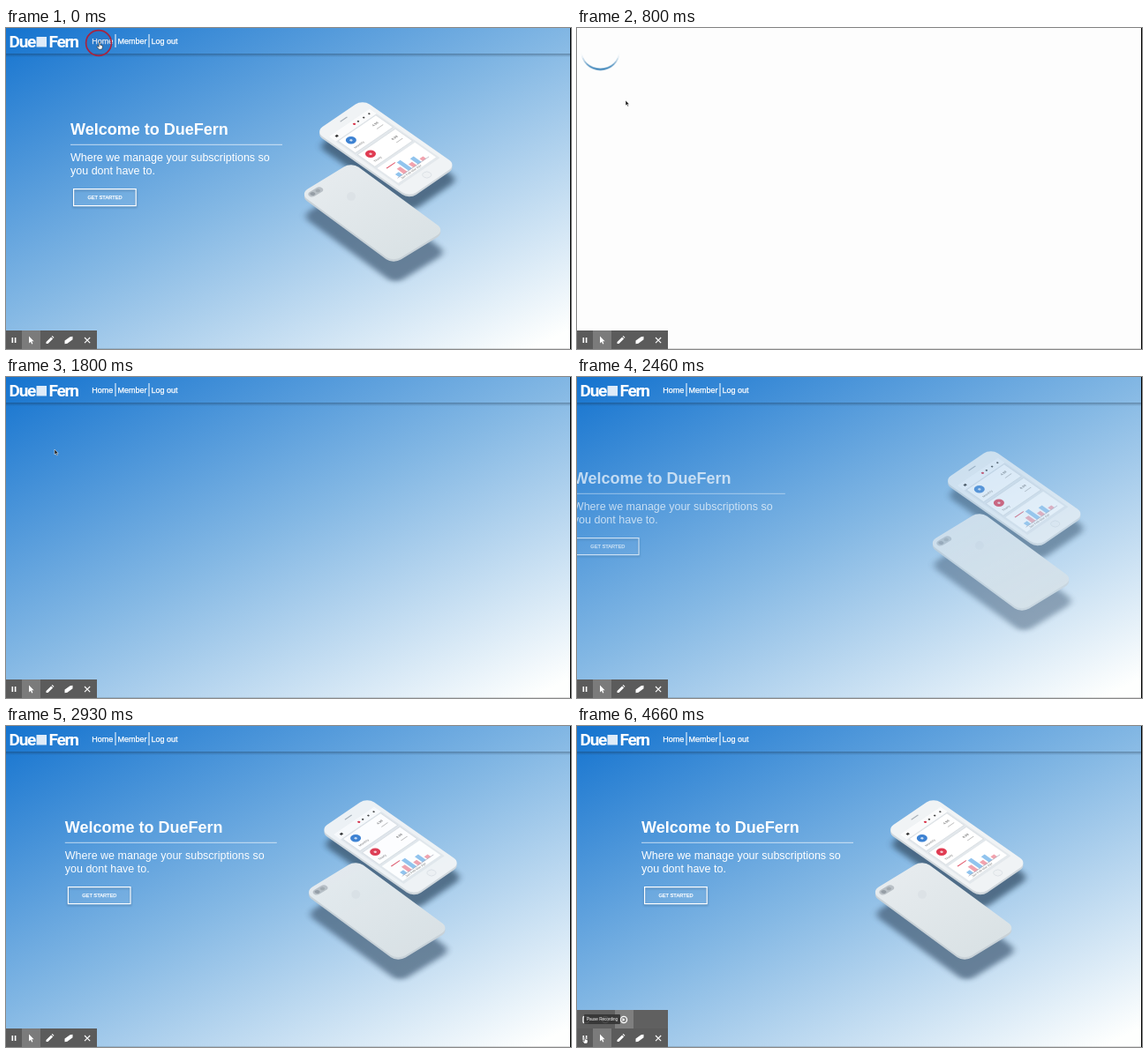
An HTML page for the animation above (4730 ms loop, 640 by 364 pixels).

```html
<!DOCTYPE html>
<html lang="en">
<head>
<meta charset="utf-8">
<title>DueFern</title>
<style>
  html, body { margin: 0; width: 100%; height: 100%; overflow: hidden; background: #fdfdfd; }
  svg { display: block; width: 640px; height: 364px; }
  text { font-family: "Liberation Sans", Arial, sans-serif; fill: #fff; }
  .logo { font: 700 19px Roboto, sans-serif; letter-spacing: -1.2px; }
  .nav { font-size: 9px; }
  .nav, .button { stroke: #fff; stroke-width: .25px; }
  .lead { font-size: 12.5px; }
  .tiny { font-size: 3.4px; fill: #777; }
</style>
</head>
<body>
<svg viewBox="0 0 640 364">
  <defs>
    <linearGradient id="sky" gradientUnits="userSpaceOnUse" x1="0" y1="0" x2="273" y2="546">
      <stop offset="0" stop-color="#1473cf"/>
      <stop offset=".48" stop-color="#84b8e4"/>
      <stop offset=".97" stop-color="#fefffe"/>
    </linearGradient>
    <linearGradient id="drop" x2="0" y2="1">
      <stop offset="0" stop-color="#123" stop-opacity=".34"/><stop offset="1" stop-color="#123" stop-opacity="0"/>
    </linearGradient>
    <linearGradient id="shell" x2="0" y2="1">
      <stop offset="0" stop-color="#e6ebee"/><stop offset="1" stop-color="#dae2e5"/>
    </linearGradient>
    <filter id="soft" x="-30%" y="-30%" width="160%" height="160%"><feGaussianBlur stdDeviation="3"/></filter>
    <filter id="lift" x="-20%" y="-20%" width="140%" height="160%"><feGaussianBlur stdDeviation="1.3"/></filter>
    <rect id="body" width="60" height="120" rx="9"/>
  </defs>

  <g id="page">
    <rect width="640" height="364" fill="url(#sky)"/>
    <rect y="29" width="640" height="4" fill="url(#drop)"/>
    <text class="logo" x="3.5" y="22">Due</text>
    <rect x="34.5" y="10" width="11.5" height="11.5" fill="#fff" opacity=".85"/>
    <text class="logo" x="48.5" y="22">Fern</text>
    <g class="nav">
      <text x="97.3" y="17.6">Home</text>
      <text x="126.6" y="17.6">Member</text>
      <text x="164.5" y="17.6">Log out</text>
    </g>
    <path d="M124 7v15M162 7v15" stroke="#fff"/>

    <g id="hero">
      <g id="intro">
        <text x="73" y="121" font-size="18" font-weight="700">Welcome to DueFern</text>
        <path d="M73 132.3h240" stroke="#fff" stroke-width=".9" opacity=".75"/>
        <text class="lead" x="73" y="151.3">Where we manage your subscriptions so</text>
        <text class="lead" x="73" y="165.8">you dont have to.</text>
        <rect x="76.5" y="184" width="71" height="19" fill="none" stroke="#246" stroke-width="1.6" opacity=".35" filter="url(#lift)"/>
        <rect x="76.6" y="182.6" width="70.6" height="19" fill="#fff" fill-opacity=".06" stroke="#fff" stroke-width="1.2"/>
        <text class="button" x="112" y="194.2" font-size="5.7" text-anchor="middle">GET STARTED</text>
      </g>

      <g id="phones">
        <use href="#body" transform="matrix(.89 -.61 .885 .62 353 134)" fill="#3b5670" opacity=".8" filter="url(#soft)"/>
        <use href="#body" transform="matrix(.975 -.6 .88 .646 335 213)" fill="#46607a" opacity=".75" filter="url(#soft)"/>

        <use href="#body" transform="matrix(.89 -.61 .885 .62 350.5 120)" fill="#d0d7dc"/>
        <g transform="matrix(.89 -.61 .885 .62 350.5 117.5)">
          <use href="#body" fill="#f0f3f5"/>
          <rect x="25" y="6" width="9" height="1.2" rx=".6" fill="#aab2ba"/>
          <rect x="4" y="13" width="52" height="90" fill="#e3e8ec"/>
          <rect x="4" y="13" width="52" height="9" fill="#fafbfc"/>
          <rect x="8.5" y="16.3" width="2.6" height="2.4" fill="#333"/>
          <circle cx="32" cy="17.5" r="1.3" fill="#d8344a"/>
          <g fill="#444"><circle cx="37" cy="17.5" r="1"/><circle cx="44" cy="17.5" r="1"/><circle cx="51" cy="17.5" r="1"/></g>
          <g id="cards"></g>
          <rect x="6" y="73" width="48" height="27" fill="#fff"/>
          <g id="bars"></g>
          <path d="M10 95h40" stroke="#99a" stroke-width=".5"/>
          <circle cx="32" cy="110.5" r="4" fill="#eef1f3" stroke="#d5dbe0" stroke-width=".6"/>
        </g>

        <use href="#body" transform="matrix(.975 -.6 .88 .646 333 190.5)" fill="#c8d1d7"/>
        <g transform="matrix(.975 -.6 .88 .646 333 188)">
          <use href="#body" fill="url(#shell)"/>
          <rect x="4" y="4" width="15" height="7" rx="3.5" fill="#b9c0c6"/>
          <circle cx="8" cy="7.5" r="2.2" fill="#959da5"/><circle cx="14" cy="7.5" r="2" fill="#a2aab0"/>
        </g>
        <circle cx="391" cy="191" r="5" fill="#dce2e6"/>
      </g>
    </g>
  </g>

  <path id="spinner" d="M-21.5 0A21.5 21.5 0 0 0 21.5 0A21.5 19.6 0 0 1 -21.5 0Z" fill="#2374b0"/>

  <path d="M0 363.5h640" stroke="#000" opacity=".13"/>
  <path d="M639.5 0v364" stroke="#000"/>

  <g id="panel">
    <rect y="322" width="103" height="21" fill="#606060"/>
    <rect x="43" y="322" width="21" height="21" fill="#7f7f7f"/>
    <g fill="none" stroke="#fff" stroke-width="1.3">
      <rect x="7" y="329.5" width="6" height="7" rx="1"/><circle cx="32" cy="333" r="3.6"/><circle cx="53" cy="333" r="3.6"/>
    </g>
    <path d="M51.5 331v4l3-2z" fill="#fff"/>
  </g>
  <g id="tip">
    <rect x="8" y="327" width="41" height="11" rx="1" fill="#333" opacity=".88"/>
    <text x="28.5" y="334.2" font-size="4.6" text-anchor="middle">Pause Recording</text>
  </g>
  <g id="toolbar">
    <rect y="343" width="103" height="21" fill="#5b5b5b"/>
    <rect x="18" y="343" width="21" height="21" fill="#7b7b7b"/>
    <g fill="#fff">
      <path d="M6.5 351h1.6v6h-1.6zM9.8 351h1.6v6h-1.6z"/>
      <path d="M26 349.5v8l1.9-1.7 1.3 2.8 1.2-.6-1.3-2.7h2.4z"/>
      <path d="M45.5 358v-2l5.6-5.6 2 2-5.6 5.6zM51.7 349.8l.8-.8 2 2-.8.8z"/>
      <path d="M66.5 354.5l6-4.2 3-.6v3.6l-6 4.4-3 .6z"/>
    </g>
    <path d="M89 351l6.2 6.2M95.2 351l-6.2 6.2" stroke="#fff" stroke-width="1.1"/>
  </g>

  <circle id="ring" cx="105" cy="17" r="14.4" fill="#1c3f8a" fill-opacity=".12" stroke="#a8243f" stroke-width="1.7"/>
  <g id="cursor">
    <path id="arrow" d="M0-2v6l1.4-1.2 1 2.1 1-.4-1-2.1h1.8z" fill="#151515" stroke="#fff" stroke-width=".5"/>
    <path id="hand" d="M-.8-3.4q.8-.8 1.5 0v2.6l2.6.7v2.3l-.8 2h-3.3l-2.2-3 .6-.8 1.6 1z" fill="#fff" stroke="#222" stroke-width=".6"/>
  </g>
</svg>
<script>
const LOOP = 4730, TICK = 200 / 3, LEAVE = 800;
const $ = id => document.getElementById(id);
const show = (id, on) => { $(id).style.display = on ? '' : 'none'; };

// Phone screen contents
const card = (y, color, label, price) => `
  <rect x="6" y="${y}" width="48" height="22" fill="#fff" stroke="#cdd3d9" stroke-width=".5"/>
  <circle cx="15" cy="${y + 7.5}" r="4.8" fill="${color}"/>
  <circle cx="15" cy="${y + 7.5}" r="1.4" fill="#fff" opacity=".75"/>
  <text class="tiny" x="10" y="${y + 18}">${label}</text>
  <text class="tiny" x="42" y="${y + 9}" font-weight="700">${price}</text>
  <rect x="42" y="${y + 13}" width="8" height=".8" fill="#bbb"/>`;
$('cards').innerHTML = card(23, '#3d82d2', 'Monthly', '4.99') + card(48, '#e03c52', 'Yearly', '8.99');

const bar = (x, h, color) => `<rect x="${x}" y="${95 - h}" width="4.4" height="${h}" fill="${color}"/>`;
$('bars').innerHTML =
  [5, 9, 15, 6, 10, 4].map((h, i) => bar(12 + i * 6, h, i % 2 ? '#f2a3ae' : '#91c4ee')).join('') +
  '<path d="M12 79h11" stroke="#e0566a"/>' +
  '<text class="tiny" x="12" y="98.8">Jan Feb Mar Apr</text>';

// Paused animations, positioned by the clock
const track = (id, frames, delay, duration, easing = 'ease') => {
  const a = $(id).animate(frames, { delay, duration, easing, fill: 'both' });
  a.pause();
  return a;
};
const at = (x, y) => `translate(${x}px, ${y}px)`;
const slide = (id, x) => track(id, [
  { transform: at(x, 0), opacity: 0 },
  { transform: at(0, 0), opacity: 1 }
], 2000, 1175);

const entrances = [slide('intro', -240), slide('phones', 202)];
const clocked = [
  track('ring', [{ opacity: 1 }, { opacity: 0 }], 0, 200, 'linear'),
  track('spinner', [
    { transform: at(26.5, 26.5) + ' rotate(0deg)' },
    { transform: at(26.5, 26.5) + ' rotate(360deg)' }
  ], 1000, 800, 'linear'),
  track('cursor', [
    { transform: at(106, 20), offset: 0, easing: 'ease-in-out' },
    { transform: at(55, 84), offset: 530 / LOOP },
    { transform: at(55, 84), offset: 3660 / LOOP, easing: 'ease-in-out' },
    { transform: at(9, 356), offset: 4260 / LOOP },
    { transform: at(9, 356), offset: 1 }
  ], 0, LOOP, 'linear')
];

function draw(time) {
  const t = Math.floor((time + 7) / TICK) * TICK;
  const before = t < LEAVE;
  entrances.forEach(a => { a.currentTime = before ? LOOP : t; });
  clocked.forEach(a => { a.currentTime = t; });
  show('page', before || t >= 1730);
  show('hero', before || t >= 2060);
  show('spinner', !before && t < 1730);
  show('cursor', t < 2060 || t >= 3660);
  const pointing = t < 190 || t >= 4200;
  show('hand', pointing);
  show('arrow', !pointing);
  show('panel', t >= 4130);
  show('tip', t >= 4460);
}

const start = performance.now();
function loop() {
  draw((performance.now() - start) % LOOP);
  requestAnimationFrame(loop);
}
loop();
</script>
</body>
</html>
```
